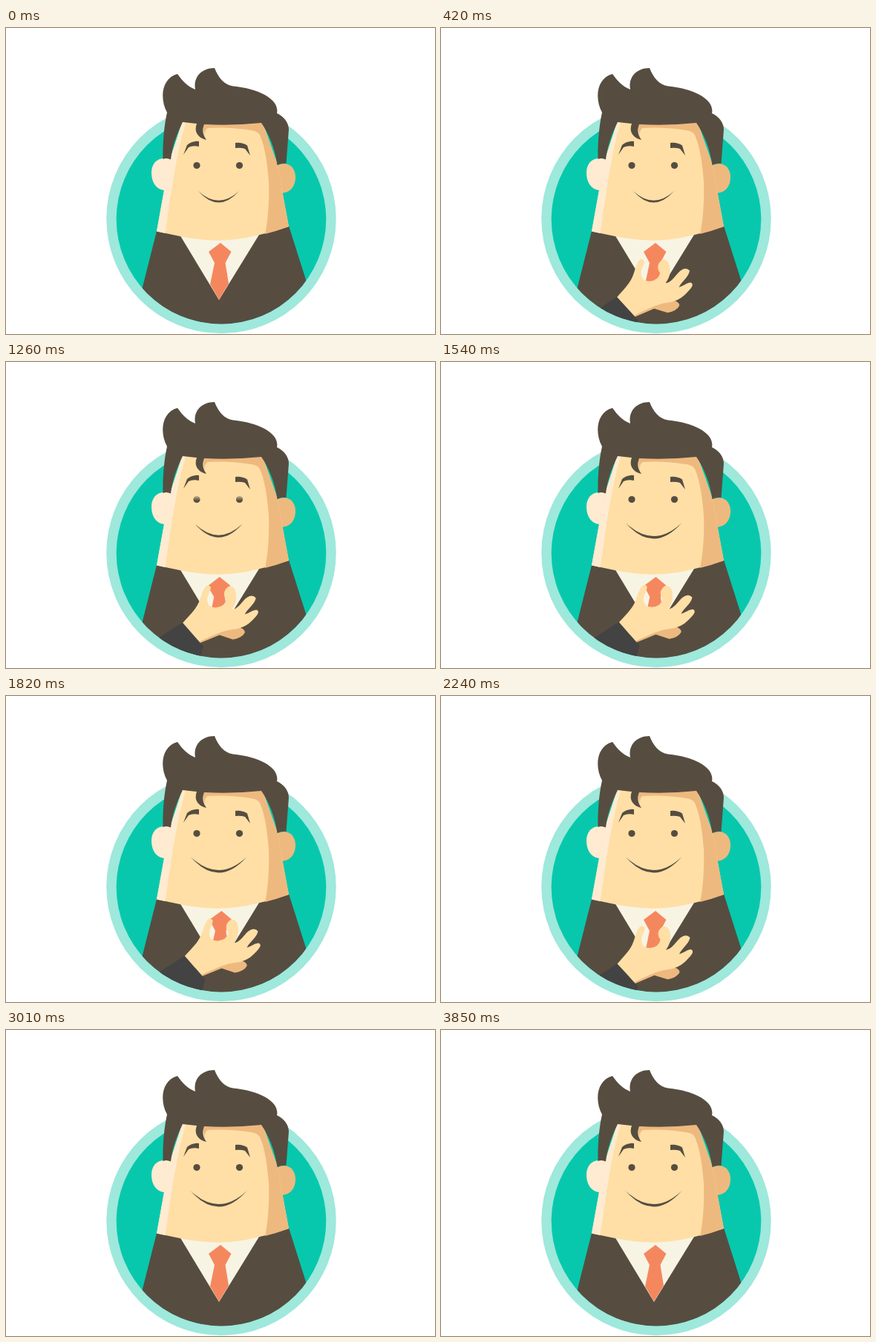
Animation, 578 px wide and 413 px high, one loop 8.35 s. Source, as an HTML page:

```html
<!DOCTYPE html>
<html lang="en">
<head>
<meta charset="utf-8">
<title>Straightening the tie</title>
<style>
  html, body { margin: 0; width: 100%; height: 100%; overflow: hidden; background: #fff; }
  svg { display: block; width: 100%; height: 100%; }
  .dark { fill: #564d40; }
  .skin { fill: #ffdfa6; }
  .shade { fill: #eeb97f; }
  .light { fill: #ffebd1; }
</style>
</head>
<body>
<svg viewBox="0 0 578 413">
  <defs>
    <clipPath id="disc"><circle cx="290" cy="258" r="141.5"/></clipPath>
    <linearGradient id="lid" x1="0" x2="0">
      <stop offset="0" stop-color="#ffdfa6"/>
      <stop offset="1" stop-color="#564d40"/>
    </linearGradient>
  </defs>

  <circle cx="290" cy="257.5" r="154.7" fill="#9ee8dc"/>
  <circle cx="290" cy="258" r="141.3" fill="#07c8ad"/>

  <g clip-path="url(#disc)">
    <path class="dark" d="M203 274L381 267L412 365V413H168Z"/>
    <path d="M234 279H341L287 367Z" fill="#f8f4e4"/>
    <g id="tie" fill="#f5875f">
      <path d="M289 290L303.500 302L295.500 317L300 345L287 366.500L275 346L281 317L273 302Z"/>
    </g>
  </g>

  <!-- head -->
  <path class="light" d="M224 178C207 171 196 181 196 195C196 209 203 219 215 219Z"/>
  <path class="shade" d="M364 186C380 178 390 188 390 201C390 214 383 223 369 223Z"/>
  <path class="skin" d="M238 125H345L366 185L372.500 222L381 268Q361 275 340 279.500Q288 293 234 281L203 274.500L220 180Z"/>
  <path class="light" d="M238 125H243C230 165 223 220 214.500 277L203 274.500L213 219L220 180Z"/>
  <path class="shade" d="M264 126H345L366 185L372.500 222L381 268Q365 274 349 278C353 260 355 232 354 207C352 178 347 153 341 143Q338 139 330 138Q300 133 272 135Q267 137 268 147Z"/>
  <path class="dark" d="M211.500 177C211 155 213 132 217 114C207 96 209 68 231 62C238 72 245 79 255 83C252 68 262 54 281 54C286 67 294 77 306 78.500C342 82 369 97 365 115C375 120 381 128 381 137L377.500 183Q371 182 365.500 185C363 165 354 142 344 128Q306 132 267 130C264 138 265 144 270 151C258 148 253 140 257 129L238 127C230 143 224 160 222 177.500Q216 175 211.500 177Z"/>
  <path class="dark" d="M239 171L244 158Q250 152 260 153V160Q252 158 246 161Z"/>
  <path class="dark" d="M309 155Q318 154 325 158.500L329 172L322 163Q316 161 309 162Z"/>
  <g fill="url(#lid)">
    <circle cx="257" cy="185.500" r="4.600"/>
    <circle cx="314.500" cy="185.500" r="4.600"/>
  </g>
  <path id="mouth" class="dark"/>

  <g clip-path="url(#disc)">
    <g id="hand">
      <path class="shade" d="M257 376C272 368 290 362 303 360L317 358Q324 361 323 365Q319 372 307 374L289 368L262 379Z"/>
      <path class="skin" d="M238 353C250 340 256 334 260 326C264 318 264 313 268 306Q272 298 277 303C278 309 270 316 273 324Q274 331 284 331Q296 330 298 320C293 314 295 306 302 302Q310 302 311 311C313 320 310 328 305 334C314 333 318 324 325 318Q333 312 338 318C336 327 328 331 323 340C330 338 334 334 339 334Q344 336 338 343C332 350 325 356 318 358C310 361 303 360 295 363C285 366 272 372 260 378Z"/>
      <path d="M239 351L267 383L248 450H90L190 383Z" fill="#434343"/>
    </g>
  </g>
</svg>
<script>
  const LOOP = 8350, STEP = 70, LAST = 3850;
  const el = id => document.getElementById(id);
  const [tie, hand, mouth, lid] = ["tie", "hand", "mouth", "lid"].map(el);
  const span = (t, from, to) => Math.min(1, Math.max(0, (t - from) / (to - from)));
  const smooth = p => p * p * (3 - 2 * p);
  const easeOut = p => 1 - (1 - p) ** 2;
  const easeInOut = p => p < .5 ? 2 * p * p : 1 - 2 * (1 - p) ** 2;

  function draw(time) {
    // the motion runs in steps, then rests until the loop ends
    const t = Math.min(LAST, Math.floor(time / STEP) * STEP);

    const tug = -1.5 * Math.sin(2 * Math.PI * span(t, 840, 2100));
    tie.setAttribute("transform", `rotate(${tug * .75} 287 366)`);

    const away = 1 - easeOut(span(t, 0, 600)) + easeInOut(span(t, 2100, 2820));
    hand.setAttribute("transform",
      `translate(${tug - 22 * away} ${-tug * .4 + 128 * away}) rotate(${-14 * away} 250 360)`);

    const k = smooth(span(t, 1050, 1530));
    const half = 27.5 + 10.5 * k, y = 220 - 3 * k;
    const left = 286.5 - half, right = 286.5 + half;
    mouth.setAttribute("d",
      `M${left} ${y}Q286.500 ${251 + 9 * k} ${right} ${y}Q286.500 ${245.5 + 7.5 * k} ${left} ${y}Z`);

    const blink = Math.max(0, 1 - Math.abs(t - 1365) / 175);
    lid.setAttribute("y1", -1.2 + 2.2 * blink);
    lid.setAttribute("y2", -.2 + 2.2 * blink);
  }

  const start = performance.now();
  function tick() {
    draw((performance.now() - start) % LOOP);
    requestAnimationFrame(tick);
  }
  tick();
</script>
</body>
</html>
```
